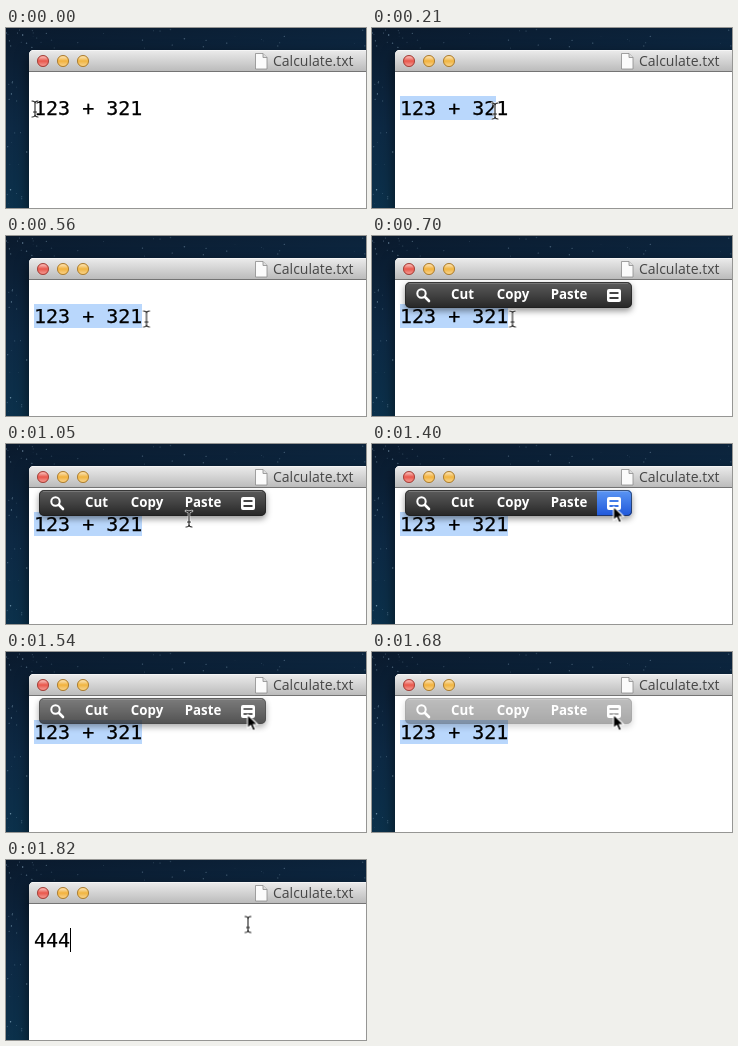
An HTML page that plays this animation: 360x180 px, repeating every 3320 ms.

```html
<!DOCTYPE html>
<html lang="en">
<head>
<meta charset="utf-8">
<title>Calculate</title>
<style>
html, body { margin: 0; width: 100%; height: 100%; overflow: hidden; background: #0b2036; }
svg { display: block; width: 100vw; height: 100vh; }
.mono { font: 20px "DejaVu Sans Mono", monospace; fill: #000; stroke: #000; stroke-width: .25; }
.title { font: 14px "Open Sans", "Noto Sans", sans-serif; fill: #464646; }
.label { font: bold 13.3px "Open Sans", "Noto Sans", sans-serif; fill: #fff; text-anchor: middle; }
.window { filter: drop-shadow(0 5px 7px rgba(0, 0, 0, .6)); }
.panel { filter: drop-shadow(0 3px 3px rgba(0, 0, 0, .42)); }

#select, #sum, #result, #popup, #hot, #ibeam, #arrow { animation: 3320ms step-end infinite; }
#select { animation-name: select; }
#sum { animation-name: sum; }
#result { animation-name: result; }
#popup { animation-name: popup; }
#hot { animation-name: hot; }
#ibeam { animation-name: ibeam; }
#arrow { animation-name: arrow; }

@keyframes select {
  0% { transform: scaleX(0); }
  2.108% { transform: scaleX(.2222); }
  4.216% { transform: scaleX(.5556); }
  6.325% { transform: scaleX(.8889); }
  8.433% { transform: scaleX(1); }
  54.819%, 100% { transform: scaleX(0); }
}
@keyframes sum {
  0% { opacity: 1; }
  54.819%, 100% { opacity: 0; }
}
@keyframes result {
  0% { opacity: 0; }
  54.819%, 100% { opacity: 1; }
}
@keyframes popup {
  0% { opacity: 0; }
  16.867% { opacity: 0; animation-timing-function: steps(2); }
  21.084% { opacity: 1; }
  44.277% { opacity: 1; animation-timing-function: steps(5); }
  54.819%, 100% { opacity: 0; }
}
@keyframes hot {
  0% { opacity: 0; }
  35.843% { opacity: 1; }
  46.385%, 100% { opacity: 0; }
}
@keyframes ibeam {
  0% { transform: translate(29px, 81px); opacity: 1; }
  2.108% { transform: translate(51px, 82px); }
  4.216% { transform: translate(87px, 83px); }
  6.325% { transform: translate(123px, 83px); }
  8.433% { transform: translate(140.5px, 83px); }
  29.518% { transform: translate(152px, 81px); }
  31.626% { transform: translate(183px, 75px); opacity: 1; }
  33.735% { transform: translate(242px, 64.5px); opacity: 0; }
  54.819%, 100% { transform: translate(242px, 64.5px); opacity: 1; }
}
@keyframes arrow {
  0% { transform: translate(216px, 68px); opacity: 0; }
  33.735% { transform: translate(216px, 68px); opacity: 1; }
  35.843% { transform: translate(234.5px, 64.5px); }
  37.951% { transform: translate(239px, 63.5px); }
  40.06% { transform: translate(240.5px, 63px); }
  42.168% { transform: translate(241.5px, 62.5px); opacity: 1; }
  54.819%, 100% { transform: translate(241.5px, 62.5px); opacity: 0; }
}
#select { transform-origin: 28px 0; }
</style>
</head>
<body>
<svg viewBox="0 0 360 180">
  <defs>
    <linearGradient id="sky" x2=".35" y2="1">
      <stop stop-color="#0a1a2d"/>
      <stop offset=".5" stop-color="#0d2944"/>
      <stop offset="1" stop-color="#0b334d"/>
    </linearGradient>
    <linearGradient id="bar" x2="0" y2="1">
      <stop stop-color="#ececec"/>
      <stop offset="1" stop-color="#b9b9b9"/>
    </linearGradient>
    <linearGradient id="dark" x2="0" y2="1">
      <stop stop-color="#5c5c5c"/>
      <stop offset=".5" stop-color="#424242"/>
      <stop offset="1" stop-color="#262626"/>
    </linearGradient>
    <linearGradient id="blue" x2="0" y2="1">
      <stop stop-color="#5c97f4"/>
      <stop offset="1" stop-color="#1f57da"/>
    </linearGradient>
    <linearGradient id="gloss" x2="0" y2="1">
      <stop stop-color="#fff" stop-opacity=".65"/>
      <stop offset=".5" stop-color="#fff" stop-opacity="0"/>
      <stop offset="1" stop-color="#fff" stop-opacity=".4"/>
    </linearGradient>
  </defs>

  <rect width="360" height="180" fill="url(#sky)"/>
  <g id="stars" fill="#a9cbe2"></g>

  <g class="window">
    <path d="M23 200V27q0-5 5-5H380V200Z" fill="#fff"/>
  </g>
  <path d="M23 44V27q0-5 5-5H380V44Z" fill="url(#bar)"/>
  <path d="M26 22.5H360" stroke="#f8f8f8" stroke-opacity=".8"/>
  <path d="M23 43.5H360" stroke="#747474"/>
  <g id="lights"></g>

  <path d="M249.5 25.5h7.5l4 4v11.5h-11.5Z" fill="#fbfbfb" stroke="#8c8c8c" stroke-width=".8"/>
  <path d="M257 25.5v4h4" fill="#ddd" stroke="#8c8c8c" stroke-width=".8"/>
  <text class="title" x="267" y="38">Calculate.txt</text>

  <rect id="select" x="28" y="68" width="108" height="24" fill="#b9d7fc"/>
  <text id="sum" class="mono" x="28" y="87">123 + 321</text>
  <g id="result">
    <text class="mono" x="28" y="87">444</text>
    <path d="M64.5 68V92" stroke="#000"/>
  </g>

  <g id="popup">
    <rect class="panel" x="33" y="46" width="227" height="26" rx="5" fill="url(#dark)"/>
    <path id="hot" d="M225 46h30q5 0 5 5v16q0 5-5 5h-30Z" fill="url(#blue)"/>
    <rect x="33.5" y="46.5" width="226" height="25" rx="4.5" fill="none" stroke="#1c1c1c" stroke-opacity=".55"/>
    <path d="M37 47.5H256" stroke="#fff" stroke-opacity=".18"/>
    <g fill="none" stroke="#fff" stroke-linecap="round">
      <circle cx="49.5" cy="57.5" r="4.2" stroke-width="2"/>
      <path d="M53 61l4 4" stroke-width="2.6"/>
    </g>
    <text class="label" x="90.5" y="63">Cut</text>
    <text class="label" x="141" y="63">Copy</text>
    <text class="label" x="197" y="63">Paste</text>
    <path d="M237 53h10q2 0 2 2v9q0 2-2 2h-10q-2 0-2-2v-9q0-2 2-2ZM237.5 56v2h9v-2ZM237.5 61v2h9v-2Z" fill="#fff" fill-rule="evenodd"/>
  </g>

  <g id="ibeam" fill="none" stroke-linecap="round">
    <path id="beam" d="M-3-8q3 0 3 2.5q0-2.5 3-2.5M0-6V6M-3 8q3 0 3-2.5q0 2.5 3 2.5M-1.5 3h3" stroke="#fff" stroke-opacity=".8" stroke-width="2.6"/>
    <path d="M-3-8q3 0 3 2.5q0-2.5 3-2.5M0-6V6M-3 8q3 0 3-2.5q0 2.5 3 2.5M-1.5 3h3" stroke="#222" stroke-width="1.1"/>
  </g>
  <path id="arrow" d="M0 0V14L3.2 11L5.5 16.2L8 15.1L5.8 10H10.2Z" fill="#000" stroke="#fff" stroke-width="1.1" stroke-linejoin="round"/>
</svg>
<script>
const NS = "http://www.w3.org/2000/svg";
const dot = (id, cx, cy, r, extra = {}) => {
  const el = document.createElementNS(NS, "circle");
  for (const [key, value] of Object.entries({ cx, cy, r, ...extra })) el.setAttribute(key, value);
  document.getElementById(id).append(el);
};

let seed = 17;
const rand = () => (seed = seed * 16807 % 2147483647) / 2147483647;
for (let i = 0; i < 60; i++) {
  const top = i < 36;
  dot("stars", rand() * (top ? 360 : 22), rand() * (top ? 21 : 180),
    .3 + rand() * .5, { opacity: .15 + rand() * .55 });
}

[["#e9574c", "#9d4039"], ["#f2b23d", "#a67a31"], ["#f0b541", "#a67a31"]].forEach(([fill, stroke], i) => {
  const x = 37 + i * 20;
  dot("lights", x, 33, 5.6, { fill, stroke, "stroke-width": .9 });
  dot("lights", x, 33, 4.8, { fill: "url(#gloss)" });
});
</script>
</body>
</html>
```
